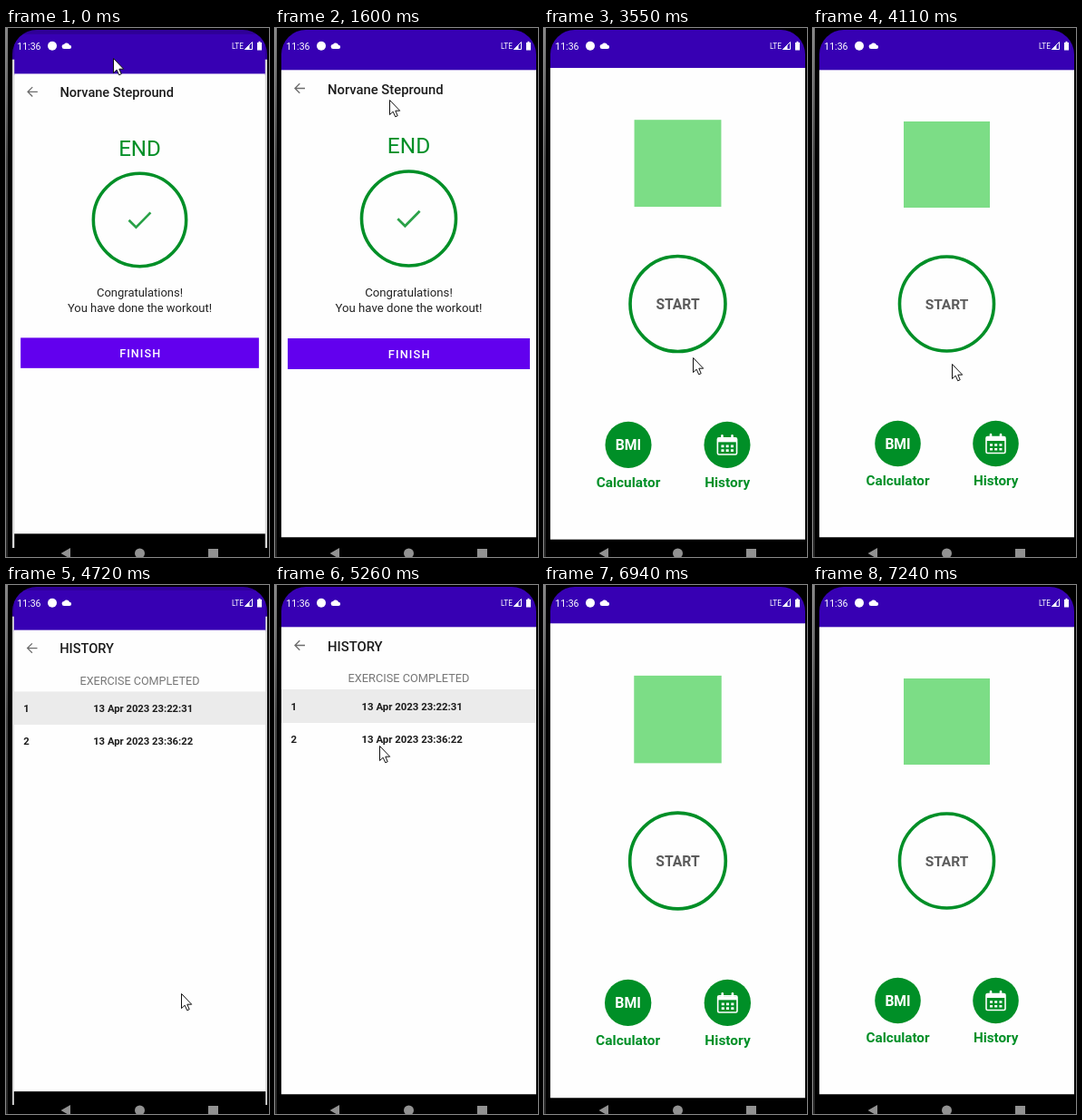
An HTML page for the animation above (7540 ms loop, 290 px wide and 583 px high).

```html
<!DOCTYPE html>
<html lang="en">
<head>
<meta charset="utf-8">
<title>Workout app</title>
<style>
  html, body { margin: 0; width: 100%; height: 100%; overflow: hidden; background: #000; }
  svg { display: block; width: 100vw; height: 100vh; }
  text { font-family: Roboto, sans-serif; }
  .mid { text-anchor: middle; }
  .medium { font-weight: 500; }
  .bold { font-weight: 700; }
  .green { fill: #008f27; }
  .ring { fill: none; stroke: #008f27; stroke-width: 3.6; }
</style>
</head>
<body>
<svg viewBox="0 0 290 583">
  <defs>
    <clipPath id="display"><rect x="7" y="2" width="281" height="620" rx="27"/></clipPath>
    <filter id="soft" x="-10%" y="-50%" width="120%" height="200%"><feGaussianBlur stdDeviation="1.8"/></filter>
    <linearGradient id="edge" x2="0" y2="1">
      <stop stop-color="#888"/><stop offset=".25" stop-color="#444"/><stop offset="1" stop-color="#2a2a2a"/>
    </linearGradient>
    <g id="window">
      <rect x="7" y="2" width="281" height="46" fill="#3700b3"/>
      <rect x="7" y="46.3" width="281" height="515.2" fill="#fefefe"/>
      <rect x="7" y="561.5" width="281" height="60"/>
    </g>
    <path id="back" d="M33 66.5H22M27.3 61.2 22 66.5 27.3 71.8" fill="none" stroke="#6c6c6c" stroke-width="1.3"/>

    <g id="blank"><use href="#window"/></g>

    <g id="end">
      <use href="#window"/><use href="#back"/>
      <text class="medium" x="58" y="72.5" font-size="14.8" fill="#1c1c1c">Norvane Stepround</text>
      <text class="mid green" x="147.5" y="138" font-size="24.5">END</text>
      <circle class="ring" cx="147.5" cy="210" r="52"/>
      <path d="M135.3 210.2 143.4 218.3 159.6 201.8" fill="none" stroke="#2aa148" stroke-width="2.7"/>
      <g class="mid" font-size="13.2" fill="#222">
        <text x="147.5" y="295.5">Congratulations!</text>
        <text x="147.5" y="313">You have done the workout!</text>
      </g>
      <rect id="shadow" x="14" y="346" width="267" height="33" opacity=".4" filter="url(#soft)"/>
      <rect x="14" y="342" width="267" height="34" fill="#6200ee"/>
      <text class="mid medium" x="148.2" y="363.7" font-size="12.8" letter-spacing="1.1" fill="#fff">FINISH</text>
    </g>

    <g id="home">
      <use href="#window"/>
      <rect x="100" y="103" width="95" height="95" fill="#7cdd86"/>
      <circle class="ring" cx="147.5" cy="304" r="52"/>
      <text class="mid bold" x="147.5" y="310" font-size="15.5" fill="#5c5c5c">START</text>
      <circle class="green" cx="93.5" cy="458" r="25.3"/>
      <circle class="green" cx="201.5" cy="458" r="25.3"/>
      <text class="mid bold" x="93.5" y="464" font-size="15.6" fill="#fff">BMI</text>
      <g fill="none" stroke="#fff">
        <rect x="191" y="450.5" width="21" height="18" rx="1.5" stroke-width="1.6"/>
        <path d="M191 453H212" stroke-width="4"/>
        <path d="M196 448V451M207 448V451" stroke-width="2.6" stroke-linecap="round"/>
        <path d="M195 459.5H208.5M195 464.2H208.5" stroke-width="2.6" stroke-dasharray="3 2.2"/>
      </g>
      <g class="mid bold" font-size="15.25">
        <text class="green" x="93.5" y="504">Calculator</text>
        <text class="green" x="201.7" y="504">History</text>
      </g>
    </g>

    <g id="history">
      <use href="#window"/><use href="#back"/>
      <circle id="ripple" cx="27" cy="66.5" r="17" opacity=".1"/>
      <text class="medium" x="58" y="72.5" font-size="14.8" fill="#1c1c1c">HISTORY</text>
      <text class="mid" x="147.5" y="107.4" font-size="12.75" fill="#777">EXERCISE COMPLETED</text>
      <rect x="7" y="115" width="281" height="37" fill="#ebebeb"/>
      <g class="bold" font-size="11.4" fill="#1c1c1c">
        <text x="17.5" y="137.5">1</text><text x="95.5" y="137.5">13 Apr 2023 23:22:31</text>
        <text x="17.5" y="174.3">2</text><text x="95.5" y="174.3">13 Apr 2023 23:36:22</text>
      </g>
    </g>
  </defs>

  <rect width="290" height="583"/>
  <rect width="2" height="583" fill="url(#edge)"/>
  <g clip-path="url(#display)">
    <use id="under"/>
    <rect id="dim" x="7" y="2" width="281" height="620" opacity=".15"/>
    <use id="front"/>
  </g>

  <g fill="#fff">
    <text x="12.3" y="24" font-size="10.5">11:36</text>
    <circle cx="51" cy="19.7" r="5"/>
    <path d="M64.3 23A2.5 2.5 0 0 1 64 18 3.4 3.4 0 0 1 70 18.8 2.1 2.1 0 0 1 70 23Z"/>
    <text x="249" y="23.3" font-size="8.2">LTE</text>
    <path d="M263.5 23.5 271.5 15.5V23.5Z" fill="none" stroke="#fff"/>
    <path d="M263 24 268.5 18.5V24Z"/>
    <path d="M277 16H278.5V14.7H280.5V16H282V24.5H277Z"/>
  </g>
  <g fill="#929292">
    <path d="M60.5 579 71 573V585Z"/>
    <circle cx="147.5" cy="579" r="5.5"/>
    <rect x="223" y="574" width="11" height="11"/>
  </g>
  <path id="cursor" d="M.5.5V16.6L4.2 13.2 6.7 18.8 9.2 17.7 6.8 12.2H11.7Z" fill="#fff" stroke="#111" stroke-width="1"/>
</svg>
<script>
const LOOP = 7540;
const BEAT = 142;
const PHASE = 20;
const SETTLE = 0.3;  // share of a zoom left after each beat

const FINISH_PRESS = 23, BACK_PRESS = 48, LEAVE = 49;

// Each screen arrives on a beat, zooming from a scale to full size.
const screens = [
  { beat: 0, name: "end", from: 0.984, over: "blank" },
  { beat: 24, name: "home", from: 1.03 },
  { beat: 33, name: "history", from: 0.987, over: "home" },
  { beat: LEAVE, name: "home", from: 1.0155 }
];

// Pointer strokes: first beat, last beat, destination
const origin = [118, 33];
const strokes = [
  [10, 11, 126, 79],
  [11, 14, 198, 451],
  [14, 15, 193, 306],
  [15, 18, 157, 335],
  [18, 21, 177, 354],
  [23, 29, 153, 370],
  [29, 31, 185, 436],
  [31, 33, 193, 450],
  [34, 39, 100, 125],
  [39, 43, 38, 39],
  [43, 46, 21, 66]
];

const [under, dim, front, cursor, shadow, ripple] =
  ["under", "dim", "front", "cursor", "shadow", "ripple"].map(id => document.getElementById(id));

const clamp = v => Math.min(1, Math.max(0, v));
const easeOut = p => 1 - (1 - p) ** 2;
const show = (node, visible) => node.setAttribute("visibility", visible ? "visible" : "hidden");

function place(node, name, scale) {
  node.setAttribute("href", "#" + name);
  node.setAttribute("transform", `translate(147.5 304) scale(${scale}) translate(-147.5 -304)`);
}

function pointerAt(beat) {
  return strokes.reduce(([x, y], [first, last, toX, toY]) => {
    const p = easeOut(clamp((beat - first) / (last - first)));
    return [x + (toX - x) * p, y + (toY - y) * p];
  }, origin);
}

function drawScreens(beat) {
  const { beat: arrival, name, from, over } = screens.findLast(s => s.beat <= beat);
  const rest = SETTLE ** (beat - arrival);
  const offset = (from - 1) * rest;
  const moving = Math.abs(offset) > 0.002;
  const layered = moving && over;
  place(front, name, moving ? 1 + offset : 1);
  if (layered) place(under, over, 1.05 - 0.005 * rest);
  show(under, layered);
  show(dim, layered);
}

function render(t) {
  const beat = Math.floor((t + PHASE) / BEAT);
  drawScreens(beat);
  show(shadow, beat >= FINISH_PRESS);
  show(ripple, beat >= BACK_PRESS);
  show(cursor, beat < LEAVE);
  cursor.setAttribute("transform", `translate(${pointerAt(beat).map(Math.round)})`);
}

const start = performance.now();
function tick() {
  render((performance.now() - start) % LOOP);
  requestAnimationFrame(tick);
}
tick();
</script>
</body>
</html>
```
